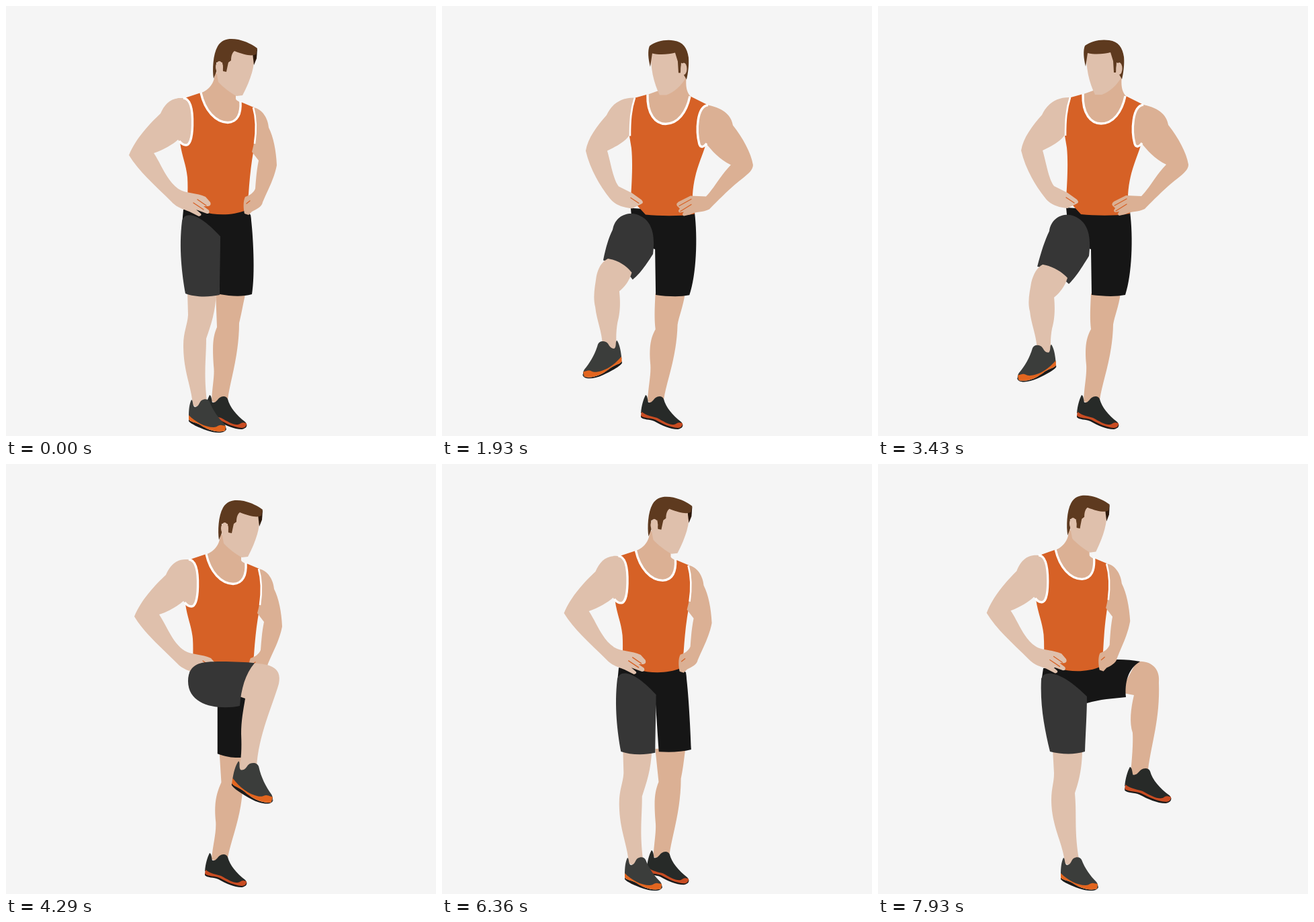
Animation of 640x640 px, one loop 8 s. Source, as an HTML page:

```html
<!DOCTYPE html>
<html lang="en">
<head>
<meta charset="utf-8">
<title>Knee raises</title>
<style>
  html, body { margin: 0; width: 100%; height: 100%; overflow: hidden; background: #f5f5f5; }
  svg { display: block; width: 100vw; height: 100vh; }
  .light { fill: #dfc0ac; }
  .dark { fill: #dbb094; }
  .shirt { fill: #d66126; }
  .black { fill: #161616; }
  .grey { fill: #363636; }
  .hair { fill: #5e3a1f; }
  .shade { fill: #2d190c; }
  .trim { fill: none; stroke: #fff; stroke-width: 3.4; }
  .gap { fill: none; stroke: #d66126; stroke-width: 1.3; stroke-linecap: round; }
</style>
</head>
<body>
<svg viewBox="0 0 640 640">
  <defs>
    <g id="nearShoe">
      <path fill="#3b3d3b" d="M-4 26C-4 14 -3 6 0 0C3 1 1 9 5 11C12 10 11 4 15 1C20 -2 25 -1 27 3C32 16 40 27 49 36C52 40 52 44 50 46L20 42Z"/>
      <path fill="#1b1b1b" d="M-4 29C-3 33 6 33 14 38C24 45 40 50 50 46L52 42C53 50 38 51 24 46C10 41 -1 36 -4 32Z"/>
      <path fill="#e2651f" d="M-4 23C6 33 20 41 33 41C39 41 40 37 45 38L51 39L50 46C40 50 24 45 14 38C6 33 -3 33 -4 29Z"/>
    </g>
    <g id="farShoe">
      <path fill="#272a28" d="M-7 26C-6 14 -3 5 0 -1C3 0 3 6 4 10C10 11 11 6 15 3C19 0 25 0 27 5C30 17 40 29 53 39C56 42 56 46 53 48L20 40Z"/>
      <path fill="#1b1b1b" d="M-7 28L-7 32C-4 36 6 35 13 38C24 44 36 50 48 50C54 49 56 45 55 42L30 42Z"/>
      <path fill="#c94c22" d="M-6 24C2 30 10 31 17 33C26 38 34 43 41 43C46 43 46 40 50 40L55 41C55 45 53 48 48 48C36 47 26 42 15 36C8 33 -2 34 -7 30Z"/>
    </g>
  </defs>

  <g id="right">
    <path class="dark" data-part="farLeg"/>
    <use href="#farShoe" data-part="farShoe"/>
    <path class="black" data-part="pelvis"/>
    <path class="black" data-part="farThigh"/>
    <g data-part="body">
      <path class="dark" d="M311 98C311 112 305 124 289 130L297 155L318 174L340 174L350 160L350 144C346 142 342 140 342 138L342 128Z"/>
      <path class="shirt" d="M266 137L290 129C296 155 310 173 330 173C345 173 350 160 350 143L369 151C373 165 374 185 371 203C366 225 363 250 361 280L357 304C338 312 312 312 292 306L270 298C270 285 271 270 270 255C268 235 262 225 259 203C270 210 279 205 278 170C277 150 274 139 266 137Z"/>
      <path class="dark" d="M368 151C382 153 390 168 391 181C398 195 402 215 403 237C399 258 389 275 382 292C381 299 372 303 366 306L361 311L355 309C353 300 353 290 356 284C362 282 368 279 371 272C372 258 373 245 376 230L366 217C371 200 374 175 368 151Z"/>
      <path class="gap" d="M358 294L363 290"/>
      <path class="light" d="M262 137C245 136 236 146 230 160C215 174 193 197 183 222C198 247 225 270 246 291C255 301 266 303 273 306L287 313Q292 312 290 309L283 303L299 309Q304 309 302 304L294 298L301 298Q306 297 304 292L297 284C284 278 268 279 258 273C240 262 232 237 220 219C235 214 248 206 256 199C261 205 266 207 269 206C276 200 278 185 277 165C275 145 270 138 262 137Z"/>
      <path class="gap" d="M285 288L298 297M279 293L294 303"/>
      <path class="trim" d="M290 129C296 156 312 173 330 173.500C345 173 350 160 349 142M264 137C276 138 278 160 277.500 178C277 198 273 207 268 207C264 207 261 205 258 201"/>
      <path class="trim" style="stroke-width:2.600" d="M368 151C372 165 373 185 370 205"/>
      <path class="light" d="M330 64L370 70C370 90 365 108 352 133L343 134C335 130 322 120 316 113L312 92Z"/>
      <path class="shade" d="M374 64L373 78L369 88L367 70Z"/>
      <path class="hair" d="M309 108C307 95 308 72 315 60C322 48 334 48 346 50C358 53 366 57 374 63L372 72C366 75 355 73 340 67C336 70 335 76 335 81L331 84C330 88 329 93 328 98L323 97L322 84L313 84L313 98Z"/>
      <ellipse class="light" cx="317.500" cy="91" rx="5.500" ry="9"/>
    </g>
    <path class="light" data-part="nearLeg"/>
    <use href="#nearShoe" data-part="nearShoe"/>
    <path class="grey" data-part="nearThigh"/>
  </g>

  <g id="left">
    <path class="dark" data-part="farLeg"/>
    <use href="#farShoe" data-part="farShoe"/>
    <path class="black" data-part="farThigh"/>
    <g data-part="body">
      <path class="dark" d="M371 106C369 125 372 132 377 138C372 165 355 180 340 179C318 179 312 155 314 135L328 130Z"/>
      <path class="shirt" d="M295 140L313 135C312 165 325 179 340 179C358 179 371 162 377 138L403 151C388 155 386 185 390 210C393 216 396 214 400 208C394 230 382 250 380 285L383 313C360 317 330 316 310 314L288 290C290 260 291 235 289 215L286 197C286 175 289 155 295 140Z"/>
      <path class="light" d="M295 140C270 139 258 153 252 166C238 182 224 200 221 219C227 245 241 270 257 290C265 300 275 303 290 305L304 298Q308 296 304 292L290 282L270 272C262 262 259 240 253 219C265 213 278 207 286 196C286 170 290 155 295 140Z"/>
      <path class="gap" d="M288 289L300 297"/>
      <path class="dark" d="M403 151C428 156 438 168 440 181C455 200 467 222 470 240C470 248 462 254 452 262C435 275 415 296 405 306C395 311 385 309 376 314L367 316Q363 314 367 310L361 311Q357 309 361 305L357 301Q355 298 359 295L377 286L400 287C412 275 422 255 437 240C420 232 408 218 400 208C396 214 392 215 390 209C386 185 388 155 403 151Z"/>
      <path class="gap" d="M360 301L378 291M362 309L378 299"/>
      <path class="trim" d="M313 135C312 165 325 179 340 179C358 179 371 162 376 138M403 151C386 153 385 190 390 209C392 215 396 214 401 208"/>
      <path class="trim" style="stroke-width:2.600" d="M294 140C288 158 287 175 287 197"/>
      <path class="light" d="M318 70C317 95 322 118 331 136L341 136C352 132 364 122 370 110L368 80L355 68Z"/>
      <path class="hair" d="M317 94C314 82 313 70 316 63C325 56 340 53 352 55C366 57 372 66 374 80C375 92 373 105 371 113L367 106L367 90L363 88L362 103L359 103L358 86L354 73C346 75 332 77 320 74Z"/>
      <ellipse class="light" cx="367" cy="97" rx="4.500" ry="9"/>
    </g>
    <path class="grey" data-part="nearThigh"/>
    <path class="light" data-part="nearLeg"/>
    <use href="#nearShoe" data-part="nearShoe"/>
  </g>
</svg>
<script>
// Poses per part: [lift, shape]. Lift runs from -1 (far knee up) over 0 (standing) to 1 (near knee up).
const rightPoses = {
  body: [
    [-1.04, 'translate(-20 -3) rotate(-1 310 300) scale(0.975 1)'],
    [-1, 'translate(-14.7 -2) rotate(-0.8 310 300) scale(0.97 1)'],
    [-0.8, 'translate(-18 -2) rotate(-0.7 310 300) scale(0.993 1)'],
    [-0.55, 'translate(-10 -1) rotate(-0.5 310 300) scale(1 1)'],
    [0, 'translate(0 0) rotate(0 310 300) scale(1 1)'],
    [1, 'translate(8 5) rotate(0 310 300) scale(1 1)'],
    [1.08, 'translate(8 5) rotate(0 310 300) scale(1 1)']],
  pelvis: [
    [-1, 'M246 304C275 302 315 300 335 293L345 291L345 345L311 350L243 325Z'],
    [-0.55, 'M257 304C280 302 325 300 351 302L357 308L359 335L316 345L254 325Z'],
    [0, 'M264 303C290 302 330 302 357 303L364 311L366 345L319 345L262 325Z'],
    [1, 'M273 308C300 306 340 306 366 306L372 316L372 350L316 350L272 325Z']],
  farThigh: [
    [-1, 'M280 312L340 292C355 290 375 291 390 294C372 305 367 325 369 347C350 349 330 350 311 356Z'],
    [-0.8, 'M284 312L348 300C365 310 392 325 408 345C390 352 376 370 366 392C350 387 330 380 313 370Z'],
    [-0.55, 'M290 312L356 307C360 340 360 320 402 400C385 403 365 412 353 424C340 410 325 390 314 376Z'],
    [0, 'M300 315L364 311C368 340 371 400 366 429C352 433 335 432 318 429C318 400 318 370 318 345Z'],
    [1, 'M305 320L372 316C376 345 380 400 364 434C350 438 335 438 315 431C315 400 315 370 315 350Z']],
  farLeg: [
    [-1, 'M385 294C410 292 420 308 418 325C420 380 407 415 402 455C394 465 382 465 376 460C378 440 380 415 379 400C374 385 376 365 381 344L360 340Z'],
    [-0.8, 'M400 345C420 365 424 380 422 398C422 440 414 475 410 506C402 512 392 512 386 510C388 490 389 470 388 452C385 430 384 415 388 395L362 382Z'],
    [-0.55, 'M398 398C410 415 412 430 411 445C411 490 399 520 393 555C385 562 375 562 370 560C372 540 374 520 373 505C370 485 369 465 377 443L352 418Z'],
    [0, 'M357 425C352 448 350 460 347 472C347 520 333 560 330 586C322 592 311 592 306 588C307 565 311 550 309 535C307 505 308 492 314 478L312 425Z'],
    [1, 'M362 428C360 448 357 465 352 480C350 525 336 555 330 586C322 592 311 592 306 588C308 565 313 550 312 533C309 505 313 490 320 474L317 425Z']],
  farShoe: [
    [-1, 'translate(375 452) rotate(0) scale(1.11 1.06)'],
    [-0.8, 'translate(386 500) rotate(0) scale(1.07 1.05)'],
    [-0.55, 'translate(368 551) rotate(0) scale(1.04 1.03)'],
    [0, 'translate(303 580) rotate(0) scale(1 1)'],
    [1, 'translate(303 580) rotate(0) scale(1 1)']],
  nearThigh: [
    [-1, 'M243 320C246 307 270 305 311 346C311 370 309 400 308 428C292 433 272 432 256 428C248 395 241 360 243 320Z'],
    [-0.55, 'M254 320C257 307 280 306 316 345C315 370 314 400 313 429C297 433 278 432 262 428C255 398 251 360 254 320Z'],
    [0, 'M262 320C266 306 285 306 319 343C319 370 318 400 318 430C300 434 280 433 267 428C262 400 257 360 262 320Z'],
    [0.25, 'M261 328C262 312 290 310 318 330C328 352 337 380 343 409C326 415 308 418 291 422C275 390 258 355 261 328Z'],
    [0.6, 'M263 330C263 305 285 303 319 312C340 322 360 342 376 364C357 373 338 388 325 400C295 385 263 358 263 330Z'],
    [1, 'M270 325C271 298 290 297 320 297C340 297 360 299 372 301C358 315 350 338 347 361C320 367 270 364 270 325Z'],
    [1.08, 'M271 323C272 296 290 294 320 294C340 294 358 295 370 296C356 312 350 335 348 360C320 366 271 362 271 323Z']],
  nearLeg: [
    [-1, 'M304 424C304 455 298 475 293 490C296 525 292 545 299 588C294 597 285 599 278 594C276 565 258 540 258 500C258 482 262 475 262 460L260 424Z'],
    [-0.55, 'M308 424C307 455 300 475 296 493C297 525 293 545 299 588C294 597 285 599 278 594C276 565 262 543 262 503C262 485 266 475 266 460L265 424Z'],
    [0, 'M313 425C312 455 305 475 298 495C298 525 294 545 299 588C294 597 285 599 278 594C276 565 264 545 264 505C264 485 270 475 271 460L270 425Z'],
    [0.25, 'M341 405C346 430 346 445 344 458C338 490 334 530 332 572C326 585 316 584 310 580C309 550 300 525 301 490C302 470 307 462 309 454L295 417Z'],
    [0.6, 'M372 364C383 385 385 400 380 420C372 455 358 490 355 516C350 524 338 526 331 522C334 490 332 470 331 450C332 425 338 410 340 398L325 394Z'],
    [1, 'M365 301C390 302 412 303 407 330C398 360 376 410 374 458C368 466 354 466 349 460C352 440 352 425 351 405C350 385 354 370 357 352L336 344Z'],
    [1.08, 'M365 296C388 297 412 300 406 327C398 356 375 405 373 452C366 460 353 460 347 455C350 438 351 425 350 402C350 382 353 367 356 349L336 342Z']],
  nearShoe: [
    [-1, 'translate(276 586) rotate(0) scale(1)'],
    [0, 'translate(276 586) rotate(0) scale(1)'],
    [0.25, 'translate(309 571) rotate(1) scale(1.02)'],
    [0.6, 'translate(331 509) rotate(5) scale(1.08)'],
    [1, 'translate(348 447) rotate(9) scale(1.15)'],
    [1.08, 'translate(346 442) rotate(9) scale(1.15)']]
};

// Lift runs from 0 (knee low at the side) to 1 (knee raised at the side).
const leftPoses = {
  body: [[0, 'translate(-8 -4)'], [1, 'translate(0 0)']],
  farThigh: [
    [0, 'M280 300L375 306C380 345 378 400 368 430C353 433 335 432 318 430L317 362L285 352Z'],
    [1, 'M288 306L383 312C386 350 384 400 370 433C355 437 335 435 319 430L318 362L285 352Z']],
  farLeg: [
    [0, 'M361 428C358 448 352 462 350 474C349 523 334 558 330 586C322 592 311 592 306 588C307 565 311 550 310 534C307 505 311 492 317 481C315 465 316 450 317 428Z'],
    [1, 'M367 430C364 448 357 465 355 476C352 525 336 555 330 586C322 592 311 592 306 588C308 565 313 550 312 533C311 505 317 492 323 483C321 465 321 450 322 428Z']],
  farShoe: [[0, 'translate(303 580)'], [1, 'translate(303 580)']],
  nearThigh: [
    [0, 'M255 335C258 315 275 308 290 312C312 320 318 340 314 372C300 395 293 405 284 414C272 403 258 393 237 388C243 365 248 350 255 335Z'],
    [1, 'M246 318C256 298 270 294 285 295C308 297 318 320 314 348C304 357 295 356 282 356C290 330 282 308 262 307C252 308 247 312 246 318Z']],
  nearLeg: [
    [0, 'M245 385C262 388 276 398 282 405C278 418 270 428 262 434C264 455 262 470 259 480C257 490 256 505 258 517C252 523 243 520 237 514C236 490 228 475 226 455C222 440 226 425 228 412C231 400 236 390 245 385Z'],
    [1, 'M262 307C280 305 288 325 286 335C286 345 282 350 278 353C284 375 280 390 278 405C276 425 277 445 279 465C272 471 262 466 256 458C255 435 247 420 244 395C240 375 243 350 243 330C243 315 250 308 262 307Z']],
  nearShoe: [
    [0, 'translate(258 504) rotate(-5) scale(-1.06 1.06)'],
    [1, 'translate(279 450) rotate(-9) scale(-1.15 1.15)']]
};

const LOOP = 8000, TURN = 1750, TURN_BACK = 3465;
const liftBefore = [[0, 0], [1150, 1.06], [TURN, 0.72]];
const liftAside = [[TURN, 0], [2600, 1], [TURN_BACK, 0]];
const liftAfter = [[TURN_BACK, 0.6], [4330, 1.08], [5900, 0], [6100, 0], [7700, -1.04], [8300, -0.92]];

// Finds the span around x; the outer spans extend past their ends.
function span(keys, x) {
  let i = 0;
  while (i < keys.length - 2 && x > keys[i + 1][0]) i++;
  const [a, b] = [keys[i], keys[i + 1]];
  return [a[1], b[1], (x - a[0]) / (b[0] - a[0])];
}

function track(keys, time) {
  const [from, to, k] = span(keys, time);
  return from + (to - from) * k * k * (3 - 2 * k);
}

const NUMBER = /-?\d+(\.\d+)?/g;
function blend(keys, lift) {
  const [from, to, k] = span(keys, lift);
  const ends = to.match(NUMBER);
  let i = 0;
  return from.replace(NUMBER, n => (+n + (ends[i++] - n) * k).toFixed(3));
}

function figure(id, poses) {
  const root = document.getElementById(id);
  const parts = [...root.querySelectorAll('[data-part]')];
  return {
    hide() { root.style.display = 'none'; },
    show(lift) {
      root.style.display = '';
      for (const el of parts) {
        el.setAttribute(el.tagName === 'path' ? 'd' : 'transform', blend(poses[el.dataset.part], lift));
      }
    }
  };
}

const right = figure('right', rightPoses);
const left = figure('left', leftPoses);
const start = performance.now();

function draw() {
  const t = (performance.now() - start) % LOOP;
  if (t >= TURN && t < TURN_BACK) {
    right.hide();
    left.show(track(liftAside, t));
  } else {
    left.hide();
    right.show(track(t < TURN ? liftBefore : liftAfter, t));
  }
  requestAnimationFrame(draw);
}
draw();
</script>
</body>
</html>
```
